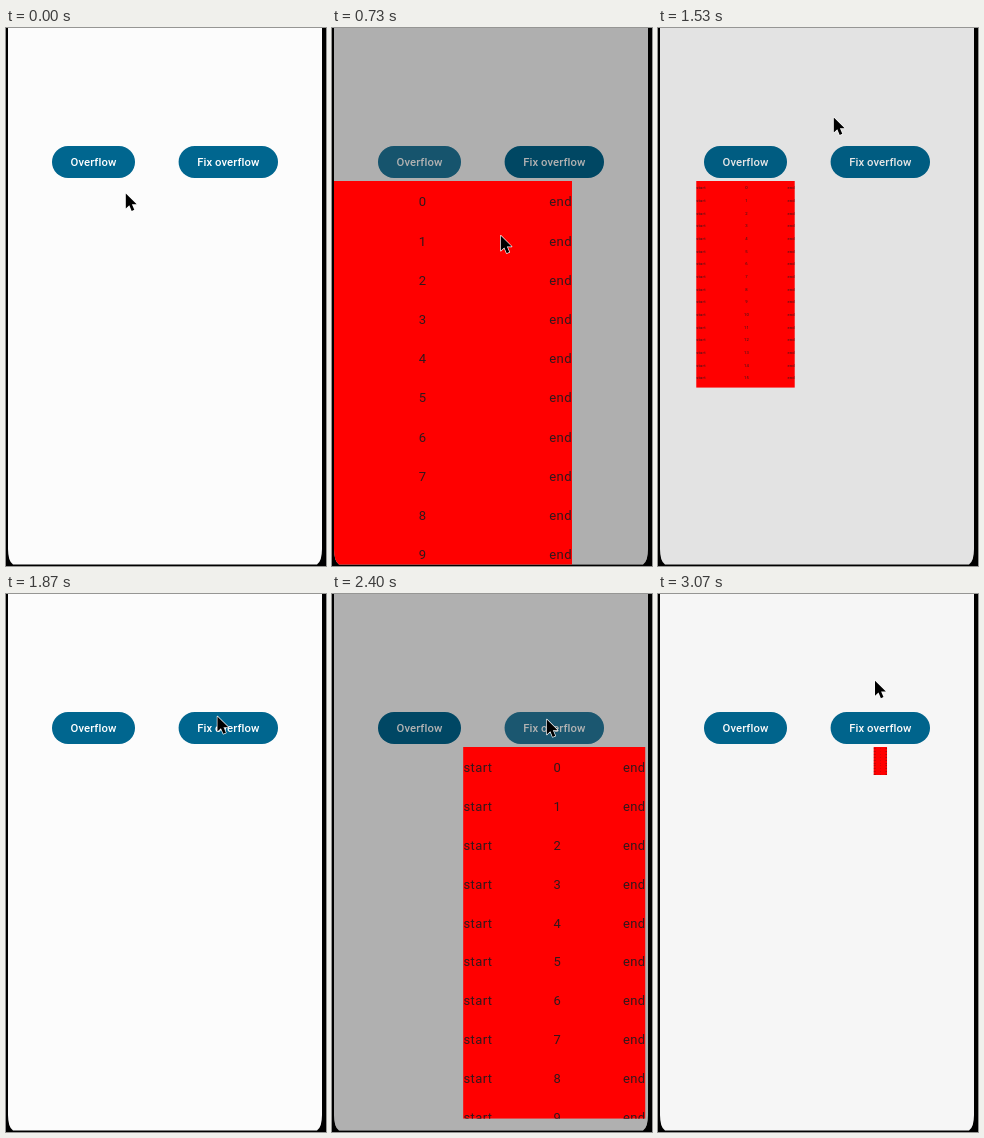
An HTML page for the animation above (3130 ms loop, 320 by 538 pixels).

```html
<!DOCTYPE html>
<html lang="en">
<head>
<meta charset="utf-8">
<title>Dropdown overflow</title>
<style>
  html, body { margin: 0; width: 100%; height: 100%; overflow: hidden; background: #000; }
  svg { display: block; width: 100vw; height: 100vh; font-family: Roboto, "Noto Sans", sans-serif; }
  .label { font-size: 11.3px; font-weight: 500; letter-spacing: .08px; text-anchor: middle; fill: #fff; }
  .row { font-size: 13.07px; letter-spacing: .4px; fill: #1c1b1f; fill-opacity: .9; }
</style>
</head>
<body>
<svg id="stage" viewBox="0 0 320 538">
  <defs>
    <clipPath id="screen"><path id="outline" d="M2 0H316V521Q316 533 311 536.6H7Q2 533 2 521Z"/></clipPath>
  </defs>
  <rect width="320" height="538"/>
  <g clip-path="url(#screen)">
    <rect width="320" height="538" fill="#fcfcfc"/>
    <g id="buttons"></g>
    <rect id="dim" width="320" height="538"/>
    <g id="menus"></g>
  </g>
  <path id="cursor" d="M0 0V15L3.5 11.8L5.9 17.4L8.5 16.3L6.1 10.8H10.9Z"
        stroke="#fff" stroke-width="1.3" paint-order="stroke" stroke-linejoin="round"/>
</svg>
<script>
const LOOP = 3130, STEP = 200 / 3;
const MENU_TOP = 153, ROW = 39.2, DIM = 0.306;
const START_WIDTH = 28.8, END_WIDTH = 22.7;

const $ = id => document.getElementById(id);
const clamp = v => Math.min(1, Math.max(0, v));
const progress = (t, from, length) => clamp((t - from) / length);
const smooth = p => p * p * (3 - 2 * p);

function add(parent, tag, attrs, text) {
  const el = document.createElementNS("http://www.w3.org/2000/svg", tag);
  for (const key in attrs) el.setAttribute(key, attrs[key]);
  if (text !== undefined) el.textContent = text;
  return parent.appendChild(el);
}

// cubic-bezier(.4, 0, .2, 1), solved by bisection
function standardEase(x) {
  let lo = 0, hi = 1;
  for (let i = 0; i < 24; i++) {
    const u = (lo + hi) / 2, v = 1 - u;
    if (1.2 * u * v * v + 0.6 * u * u * v + u * u * u < x) lo = u; else hi = u;
  }
  return smooth(lo);
}

const items = [
  { id: "overflow", label: "Overflow", x: 46, width: 83, menuWidth: 305, menuHeight: 639,
    press: 325, pressX: 97, open: 365, close: 1360, closeLength: 400 },
  { id: "fixed", label: "Fix overflow", x: 172.6, width: 99.4, menuWidth: 184, menuHeight: 375,
    press: 2050, pressX: 215, open: 2093, close: 2790, closeLength: 410 }
];

// [time, x, y]
const cursorPath = [
  [30, 119.8, 165.5], [290, 97, 135], [450, 97, 135], [730, 168.8, 207.8], [850, 168.8, 207.8],
  [1270, 175.8, 89.5], [1580, 175.8, 89.5], [1930, 214.8, 125.5], [2440, 214.8, 125.5],
  [2700, 217, 86.8], [LOOP, 217, 86.8]
];

function buildButton(item) {
  const shape = { x: item.x, y: 118, width: item.width, height: 32, rx: 16 };
  const clip = add(document.querySelector("defs"), "clipPath", { id: item.id + "Button" });
  add(clip, "rect", shape);
  add($("buttons"), "rect", { ...shape, fill: "#00668f" });
  const group = add($("buttons"), "g", { "clip-path": `url(#${item.id}Button)` });
  item.ripple = add(group, "circle", { cx: item.pressX, cy: 134, fill: "#fff" });
  add($("buttons"), "text", { class: "label", x: item.x + item.width / 2, y: 138.2 }, item.label);
}

function buildMenu(item) {
  const { menuWidth: width, menuHeight: height } = item;
  const box = { x: -width / 2, width, height };
  const clip = add(document.querySelector("defs"), "clipPath", { id: item.id + "Menu" });
  add(clip, "rect", box);
  item.menu = add($("menus"), "g", { "clip-path": `url(#${item.id}Menu)` });
  add(item.menu, "rect", { ...box, fill: "#f00" });
  for (let i = 0; i * ROW < height; i++) {
    const y = i * ROW + 25.4;
    add(item.menu, "text", { class: "row", x: -width / 2 + 0.4, y }, "start");
    add(item.menu, "text", { class: "row", x: (START_WIDTH - END_WIDTH) / 2, y, "text-anchor": "middle" }, i);
    add(item.menu, "text", { class: "row", x: width / 2 - END_WIDTH, y }, "end");
  }
}

function cursorAt(t) {
  const next = cursorPath.findIndex(point => point[0] > t);
  if (next <= 0) return cursorPath[0].slice(1);
  const [t0, x0, y0] = cursorPath[next - 1], [t1, x1, y1] = cursorPath[next];
  const p = smooth((t - t0) / (t1 - t0));
  return [x0 + (x1 - x0) * p, y0 + (y1 - y0) * p];
}

function draw(t) {
  let shown = 0;
  for (const item of items) {
    const scale = standardEase(progress(t, item.open, 350))
                - standardEase(progress(t, item.close, item.closeLength));
    const visible = scale > 0.005;
    item.menu.setAttribute("visibility", visible ? "visible" : "hidden");
    if (visible) {
      const center = item.x + item.width / 2;
      item.menu.setAttribute("transform", `translate(${center} ${MENU_TOP}) scale(${scale})`);
    }
    shown = Math.max(shown, scale);

    const spread = progress(t, item.press, 140);
    const fade = 1 - progress(t, item.press + 350, 300);
    item.ripple.setAttribute("r", 15 + 75 * spread);
    item.ripple.setAttribute("fill-opacity", spread > 0 ? 0.15 * fade : 0);
  }
  $("dim").setAttribute("fill-opacity", DIM * shown);
  $("cursor").setAttribute("transform", `translate(${cursorAt(t)})`);
}

items.forEach(item => { buildButton(item); buildMenu(item); });

const began = performance.now();
function tick() {
  const t = (performance.now() - began) % LOOP;
  draw(Math.floor((t + 4) / STEP) * STEP);
  requestAnimationFrame(tick);
}
tick();
</script>
</body>
</html>
```
